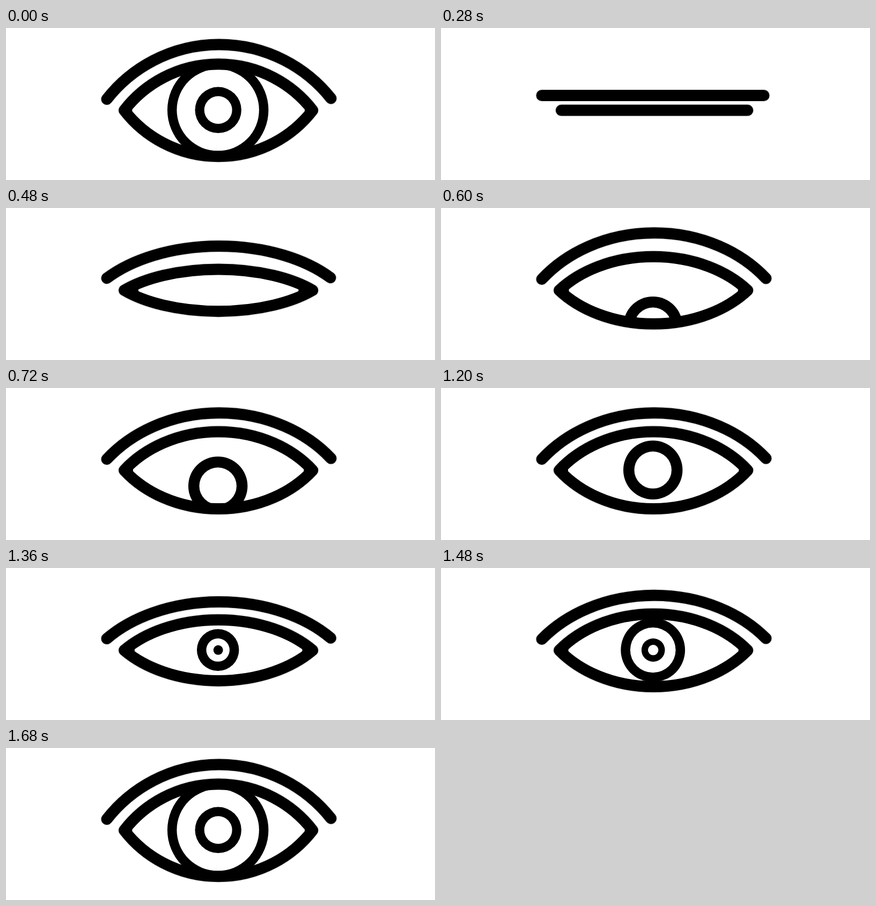
An HTML page with a canvas for the animation above (5.36 s loop, 800 by 285 pixels).

```html
<!DOCTYPE html>
<html lang="en">
<head>
<meta charset="utf-8">
<title>Blinking eye</title>
<style>
  html, body { margin: 0; width: 100%; height: 100%; overflow: hidden; background: #fff; }
  canvas { display: block; width: 100vw; height: 100vh; }
</style>
</head>
<body>
<canvas id="stage" width="800" height="285"></canvas>
<script>
const ctx = document.getElementById('stage').getContext('2d');
const LOOP = 5360, STEP = 40;
const SHUT = 280, SQUINT = 1200, WIDEN = 1360, END = 1680;
const INK = '#000', PAPER = '#fff', EDGE = '#ebebeb', LINE = 21;
const MID_Y = 154.3, EYE_X = 395.2, EYE_Y = 153.8;
const LID_RISE = 86.5, BROW_RISE = 101.7;

const ramp = (t, from, to) => Math.min(1, Math.max(0, (t - from) / (to - from)));
const mix = (a, b, k) => a + (b - a) * k;
const squint = t => ramp(t, SQUINT, WIDEN);
const widen = t => t <= SHUT ? 1 : ramp(t, WIDEN, END);

// 1 is wide open, 0 is shut; the lid takes longer to reopen than the brow.
function openness(t, reopened) {
  if (t <= SHUT) return 1 - t / SHUT;
  const half = 0.835 * ramp(t, SHUT, reopened) - 0.175 * squint(t);
  return mix(half, 1, widen(t));
}

// Circular arc of height `full`, squashed vertically to height `rise`.
function arc(x0, y0, x1, y1, rise, full) {
  if (rise < 0.5) return `L${x1} ${y1}`;
  const half = Math.abs(x1 - x0) / 2;
  const r = (half * half + full * full) / (2 * full);
  return `A${r} ${r * rise / full} 0 0 1 ${x1} ${y1}`;
}

function stroke(path, width, color) {
  ctx.lineWidth = width;
  ctx.strokeStyle = color;
  ctx.stroke(path);
}

function disc(x, y, r, color) {
  ctx.fillStyle = color;
  ctx.beginPath();
  ctx.arc(x, y, r, 0, Math.PI * 2);
  ctx.fill();
}

function browPath(open) {
  const lift = Math.min(1, 1.3 * open);
  const x0 = 188, x1 = 602 + 4 * lift;
  const y0 = 126.5 + 7 * lift, y1 = y0 - 1.5 * lift;
  const rise = (y0 + y1) / 2 - 126.5 + 95.5 * open;
  return new Path2D(`M${x0} ${y0}` + arc(x0, y0, x1, y1, rise, BROW_RISE));
}

function drawIris(t) {
  const wide = widen(t), small = squint(t);
  const drop = t > SHUT ? 120 * (1 - ramp(t, 480, 960)) ** 2 : 0;
  const r = mix(mix(45, 30.5, small), 85.5, wide);
  const w = mix(20.5, 17.5, Math.max(small, wide));
  const y = EYE_Y + drop;
  disc(EYE_X, y, r + w / 2, INK);
  disc(EYE_X, y, r - w / 2, PAPER);
  disc(EYE_X + 0.5, y, mix(9 * small, 43.2, wide), INK);
  disc(EYE_X + 0.5, y, 26 * wide, PAPER);
}

// Blunt the inner corners of the lids.
function bluntCorners(x0, x1, lid) {
  const half = (x1 - x0) / 2;
  const slope = Math.tan(2 * Math.atan(LID_RISE / half)) * lid / LID_RISE;
  const cosec = 1 / Math.sin(Math.atan(slope));
  const reach = Math.min(half, LINE / 2 * cosec + 6 * (cosec - 1));
  ctx.fillStyle = INK;
  ctx.fillRect(x0, MID_Y - 4, reach, 8);
  ctx.fillRect(x1 - reach, MID_Y - 4, reach, 8);
}

function draw(t) {
  const lid = LID_RISE * openness(t, 647), brow = browPath(openness(t, 570));
  const x0 = 224.3 - Math.min(3.8, lid * 0.1), x1 = 571.8;
  const lens = new Path2D(`M${x0} ${MID_Y}` + arc(x0, MID_Y, x1, MID_Y, lid, LID_RISE) +
    arc(x1, MID_Y, x0, MID_Y, lid, LID_RISE) + 'Z');

  ctx.fillStyle = PAPER;
  ctx.fillRect(0, 0, 800, 285);
  ctx.lineCap = ctx.lineJoin = 'round';
  for (const path of [brow, lens]) stroke(path, LINE + 3, EDGE);
  stroke(brow, LINE, INK);
  ctx.fillStyle = PAPER;
  ctx.fill(lens);

  ctx.save();
  ctx.clip(lens);
  drawIris(t);
  ctx.restore();

  stroke(lens, LINE, INK);
  bluntCorners(x0, x1, lid);
}

const start = performance.now();
function tick() {
  const t = (performance.now() - start) % LOOP;
  draw(Math.min(END, Math.floor(t / STEP) * STEP));
  requestAnimationFrame(tick);
}
tick();
</script>
</body>
</html>
```
